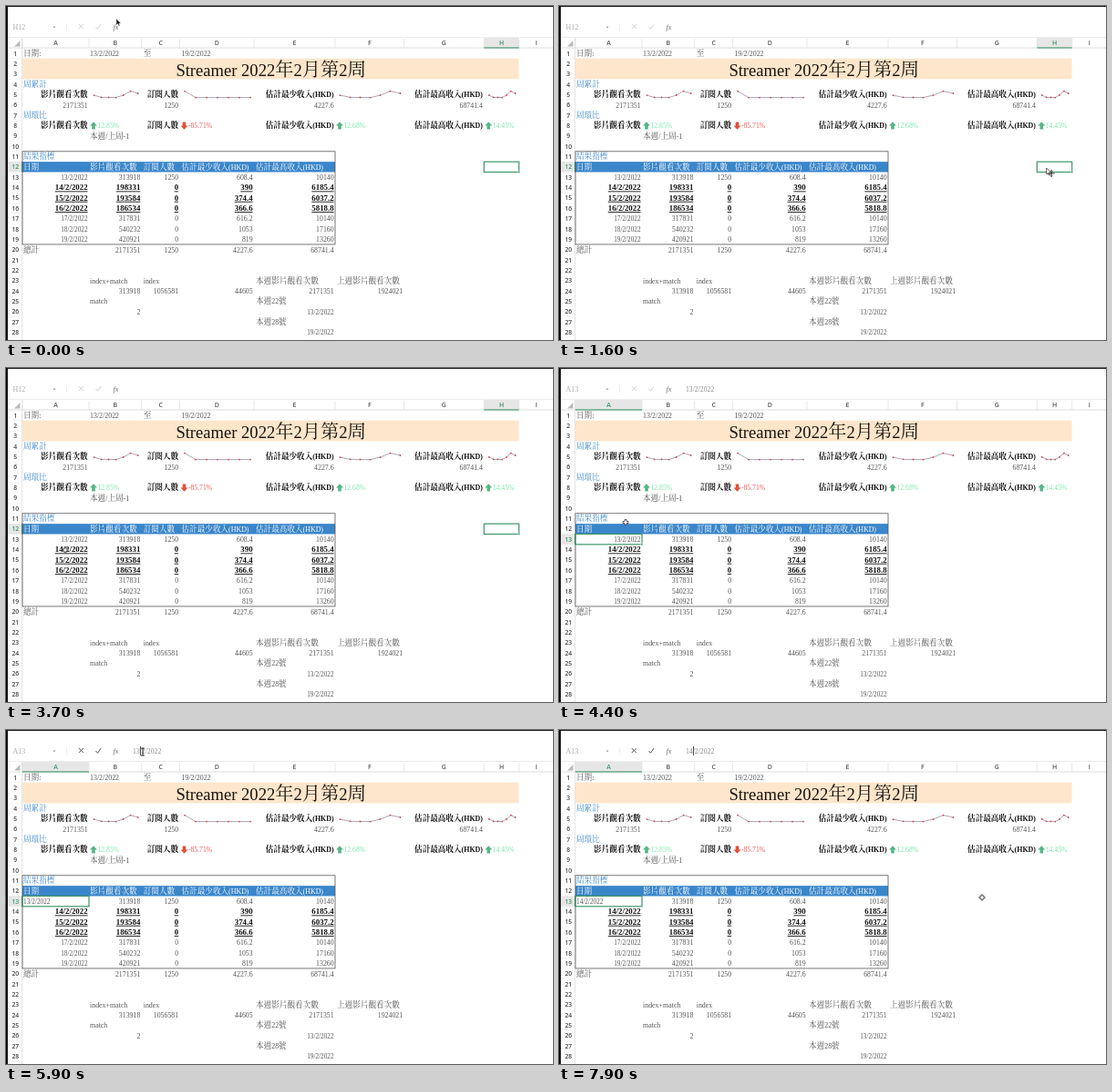
An HTML page that plays this animation: 600x367 px, repeating every 8 s.

```html
<!DOCTYPE html>
<html lang="zh-Hant">
<head>
<meta charset="utf-8">
<title>Weekly sheet</title>
<style>
  html, body { margin: 0; width: 100%; height: 100%; overflow: hidden; background: #fff; }
  svg { display: block; width: 100vw; height: 100vh; }
  text {
    font-family: "Liberation Serif", "Noto Serif CJK TC", "Noto Sans CJK TC", "Noto Sans CJK", serif;
    font-weight: 300;
    white-space: pre;
  }
  .bold { font-weight: 700; }
  .sans { font-family: "Open Sans", "Noto Sans", sans-serif; font-weight: 600; }
</style>
</head>
<body>
<svg id="stage" viewBox="0 0 600 367"></svg>
<script>
(() => {
const NS = "http://www.w3.org/2000/svg";
const stage = document.getElementById("stage");
const GREEN = "#3f9468", BLUE = "#3a86ca", GRAY = "#565656", INK = "#111";
const LOOP = 8000, STEP = 100;

const edges = [18, 91, 148.7, 190.5, 272, 361, 436.5, 524.3, 562.7, 601];
const rowH = 11.35;
const rowTop = n => 46.3 + (n - 1) * rowH;
const rowMid = n => rowTop(n) + rowH / 2;
const col = letter => letter.charCodeAt(0) - 65;

function set(el, attrs) {
  for (const k in attrs) el.setAttribute(k, attrs[k]);
  return el;
}

function add(tag, attrs, parent = stage) {
  const el = set(document.createElementNS(NS, tag), attrs);
  parent.append(el);
  return el;
}

const rect = (x, y, w, h, fill) => add("rect", { x, y, width: w, height: h, fill });
const line = (x1, y1, x2, y2, stroke, w = 0.7) =>
  add("line", { x1, y1, x2, y2, stroke, "stroke-width": w });

// Latin runs are set slightly smaller than the Chinese ones.
function text(str, x, y, { size = 8.6, fill = GRAY, anchor = "start", cls = "", under = false } = {}) {
  const el = add("text", { x, y, fill, "text-anchor": anchor, class: cls, "font-size": size });
  if (under) set(el, { "text-decoration": "underline" });
  for (const run of str.match(/[\u3000-\u9fff]+|[^\u3000-\u9fff]+/g)) {
    const latin = run.charCodeAt(0) < 0x3000;
    add("tspan", { "font-size": latin ? size * 0.92 : size }, el).textContent = run;
  }
  return el;
}

function left(ref, str, opt) {
  const c = col(ref[0]);
  return text(str, edges[c] + (c > 1 ? 2 : 1), rowMid(+ref.slice(1)) + 2.9, opt);
}

function right(ref, str, opt) {
  const size = /\/\d+\//.test(str) ? 7.9 : 8.5;
  const x = edges[col(ref[0]) + 1] - 1.4;
  return text(str, x, rowMid(+ref.slice(1)) + 2.9, { size, anchor: "end", ...opt });
}

/* ---------- static sheet ---------- */
rect(0, 0, 600, 367, "#fff");
rect(0, 0, 600, 1, "#222");
line(2, 34.5, 600, 34.5, "#e4e4e4");
line(2, 46, 600, 46, "#cfcfcf");
line(17.6, 35, 17.6, 367, "#d9d9d9");
add("path", { d: "M15.5 38v6.5h-6.5z", fill: "#bbb" });
edges.forEach(x => line(x, 36, x, 46, "#dedede"));
for (let n = 1; n < 29; n++) line(2, rowTop(n + 1), 17, rowTop(n + 1), "#ececec", 0.5);

const headMark = rect(0, 35, 1, 11, "#e6e6e6");
const headLine = rect(0, 45.4, 1, 1.1, GREEN);
const rowMark = rect(2, 0, 15.5, rowH, "#e6e6e6");
const rowLine = rect(17, 0, 1.1, rowH, GREEN);
const heads = [..."ABCDEFGHI"].map((ch, i) =>
  text(ch, (edges[i] + edges[i + 1]) / 2, 42.6, { size: 7.6, anchor: "middle", cls: "sans" }));
const nums = Array.from({ length: 28 }, (_, i) =>
  text(String(i + 1), 10.3, rowMid(i + 1) + 2.6, { size: 7.4, anchor: "middle", cls: "sans" }));

left("A1", "日期:");
left("B1", "13/2/2022");
left("C1", "至");
left("D1", "19/2/2022");

rect(18, rowTop(2), 544.5, rowH * 2, "#fde6cb");
text("Streamer 2022年2月第2周", 290.5, 77.2, { size: 20.2, anchor: "middle", fill: "#1c1410" });

left("A4", "周累計", { fill: BLUE });
left("A7", "周環比", { fill: BLUE });
left("B9", "本週/上周-1");

const titles = ["影片觀看次數", "訂閱人數", "估計最少收入(HKD)", "估計最高收入(HKD)"];
const sums = ["2171351", "1250", "4227.6", "68741.4"];
["A", "C", "E", "G"].forEach((c, i) => {
  for (const n of [5, 8]) right(c + n, titles[i], { size: 8.6, cls: "bold", fill: INK });
  right(c + 6, sums[i]);
});

const days = [
  [313918, 1250, 608.4, 10140],
  [198331, 0, 390, 6185.4],
  [193584, 0, 374.4, 6037.2],
  [186534, 0, 366.6, 5818.8],
  [317831, 0, 616.2, 10140],
  [540232, 0, 1053, 17160],
  [420921, 0, 819, 13260]
];

function spark(c, k) {
  const vals = days.map(d => d[k]);
  const lo = Math.min(...vals), hi = Math.max(...vals);
  const x0 = edges[col(c)] + 5.5, w = edges[col(c) + 1] - x0 - 4;
  const pts = vals.map((v, i) => [x0 + w * i / 6, 100.6 - 7 * (v - lo) / (hi - lo)]);
  add("polyline", { points: pts.join(" "), fill: "none", stroke: "#8d7f98", "stroke-width": 0.7 });
  pts.forEach(([cx, cy]) => add("circle", { cx, cy, r: 0.9, fill: "#d6454b" }));
}
["B", "D", "F", "H"].forEach((c, k) => spark(c, k));

function trend(c, str, up) {
  const x = edges[col(c)] + 5, y = rowMid(8);
  add("path", {
    d: "M0-4.3L4 0H1.8V4H-1.8V0H-4Z",
    transform: `translate(${x} ${y})${up ? "" : " scale(1 -1)"}`,
    fill: up ? "#55b685" : "#e2503c"
  });
  text(str, x + 4.4, y + 2.9, { size: 8.4, fill: up ? "#7ce6ad" : "#f0595c" });
}
trend("B", "12.85%", true);
trend("D", "-85.71%", false);
trend("F", "12.68%", true);
trend("H", "14.45%", true);

left("A11", "結果指標", { fill: BLUE });
rect(18, rowTop(12), 343, rowH, BLUE);
left("A12", "日期", { fill: "#fff" });
["B", "C", "D", "E"].forEach((c, i) => left(c + 12, titles[i], { fill: "#fff" }));

let firstDate;
days.forEach((vals, i) => {
  const n = 13 + i;
  const strong = i > 0 && i < 4;
  const opt = strong ? { cls: "bold", fill: INK, under: true, size: 9.6 } : {};
  const date = right("A" + n, `${n}/2/2022`, opt);
  if (!i) firstDate = date;
  vals.forEach((v, k) => right("BCDE"[k] + n, String(v), opt));
});
set(rect(18, rowTop(11), 343, rowH * 9, "none"), { stroke: "#555", "stroke-width": 0.8 });

left("A20", "總計");
sums.forEach((s, k) => right("BCDE"[k] + 20, s));

left("B23", "index+match");
left("C23", "index");
left("E23", "本週影片觀看次數");
left("F23", "上週影片觀看次數");
right("B24", "313918");
right("C24", "1056581");
right("D24", "44605");
right("E24", "2171351");
right("F24", "1924021");
left("B25", "match");
right("B26", "2");
left("E25", "本週22號");
right("E26", "13/2/2022");
left("E27", "本週28號");
right("E28", "19/2/2022");
rect(0, 0, 2, 367, "#111");

/* ---------- formula bar, selection, pointer ---------- */
const nameBox = text("H12", 7.5, 26, { fill: "#a9a9a9" });
add("path", { d: "M51.5 22.5h3l-1.5 2z", fill: "#999" });
[20.5, 23, 25.5].forEach(y => rect(66, y, 0.8, 0.8, "#bbb"));
const no = add("path", { d: "M79.8 20l5 5m0-5l-5 5", fill: "none", "stroke-width": 1 });
const yes = add("path", { d: "M98.5 23l2 2.3l3.6-5.3", fill: "none", "stroke-width": 1 });
set(text("fx", 117.5, 25.5, { size: 9, fill: "#777" }), { "font-style": "italic" });
const formula = text("13/2/2022", 139, 26, { size: 8.4, fill: "#8a8a8a" });
const caret = rect(148, 18, 0.8, 10, "#222");

const box = set(rect(0, 0, 1, rowH, "none"), { stroke: GREEN, "stroke-width": 1.2 });
const knob = set(rect(0, 0, 2.4, 2.4, GREEN), { stroke: "#fff", "stroke-width": 0.5 });
const editText = left("A13", "13/2/2022", { size: 7.9 });

const CROSS = "M-1-3H1V-1H3V1H1V3H-1V1H-3V-1H-1Z";
const ARROW = "M0 0V7L1.7 5.5L2.8 8L4 7.5L2.9 5.1H5Z";
const shapes = {
  cross: [[CROSS, "#fff", "#333", 0.8]],
  arrow: [[ARROW, "#111", "#fff", 0.4]],
  move: [
    [ARROW, "#fff", "#222", 0.7],
    ["M5.5 2.5V9.5M2 6H9M4.5 3.5L5.5 2.5L6.5 3.5M4.5 8.5L5.5 9.5L6.5 8.5", "none", "#222", 0.9]
  ],
  beam: [["M-1.8-4H1.8M0-4V4M-1.8 4H1.8", "none", "#222", 1]]
};
const pointer = {};
for (const kind in shapes) {
  pointer[kind] = add("g", {});
  for (const [d, fill, stroke, w] of shapes[kind])
    add("path", { d, fill, stroke, "stroke-width": w }, pointer[kind]);
}

// time, x, y, pointer shape from this time on
const route = [
  [0, 121, 14, "arrow"],
  [200, 150, 60, "cross"],
  [500, 330, 170, "cross"],
  [900, 500, 200, "cross"],
  [1300, 534, 178, "move"],
  [1800, 535, 178, "move"],
  [2000, 548, 178, "cross"],
  [2400, 556, 180, "cross"],
  [2800, 542, 178, "cross"],
  [3000, 542, 178, "cross"],
  [3300, 310, 186, "cross"],
  [3700, 65, 200, "cross"],
  [4000, 62, 189, "cross"],
  [4300, 64, 188, "cross"],
  [4700, 122, 70, "cross"],
  [5000, 150, 24, "beam"],
  [6400, 150, 24, "beam"],
  [6600, 180, 58, "cross"],
  [6800, 212, 100, "cross"],
  [7200, 350, 152, "cross"],
  [7600, 464, 184, "cross"],
  [LOOP, 464, 184, "cross"]
];

const show = (el, on) => set(el, { display: on ? "" : "none" });
const write = (el, str) => { el.firstChild.textContent = str; };

function placePointer(t) {
  let i = 0;
  while (t >= route[i + 1][0]) i++;
  const [t0, x0, y0, kind] = route[i], [t1, x1, y1] = route[i + 1];
  const u = (t - t0) / (t1 - t0), e = u * u * (3 - 2 * u);
  for (const k in pointer) show(pointer[k], k === kind);
  set(pointer[kind], { transform: `translate(${x0 + (x1 - x0) * e} ${y0 + (y1 - y0) * e})` });
}

function select(ref) {
  const c = col(ref[0]), n = +ref.slice(1);
  const x = edges[c], width = edges[c + 1] - x, y = rowTop(n);
  set(box, { x, y, width });
  set(knob, { x: x + width - 1.4, y: y + rowH - 1.4 });
  set(headMark, { x, width });
  set(headLine, { x, width });
  set(rowMark, { y });
  set(rowLine, { y });
  heads.forEach((h, i) => set(h, { fill: i === c ? GREEN : "#555" }));
  nums.forEach((h, i) => set(h, { fill: i === n - 1 ? GREEN : "#444" }));
  write(nameBox, ref);
}

function draw(t) {
  const picked = t >= 4100, editing = t >= 5300, typing = t >= 6400;
  const value = t < 6400 ? "13/2/2022" : t < 6600 ? "1/2/2022" : "14/2/2022";
  const ink = editing ? "#555" : "#d2d2d2";
  select(picked ? "A13" : "H12");
  write(formula, value);
  write(editText, value);
  show(formula, picked);
  show(firstDate, !editing);
  show(editText, editing);
  show(knob, !editing);
  show(caret, editing && t % 1100 < 800);
  set(caret, { x: typing && t < 6600 ? 143 : 147 });
  set(no, { stroke: ink });
  set(yes, { stroke: ink });
  placePointer(t);
}

const start = performance.now();
function tick() {
  const t = (performance.now() - start) % LOOP;
  draw(Math.floor(t / STEP) * STEP);
  requestAnimationFrame(tick);
}
tick();
})();
</script>
</body>
</html>
```
